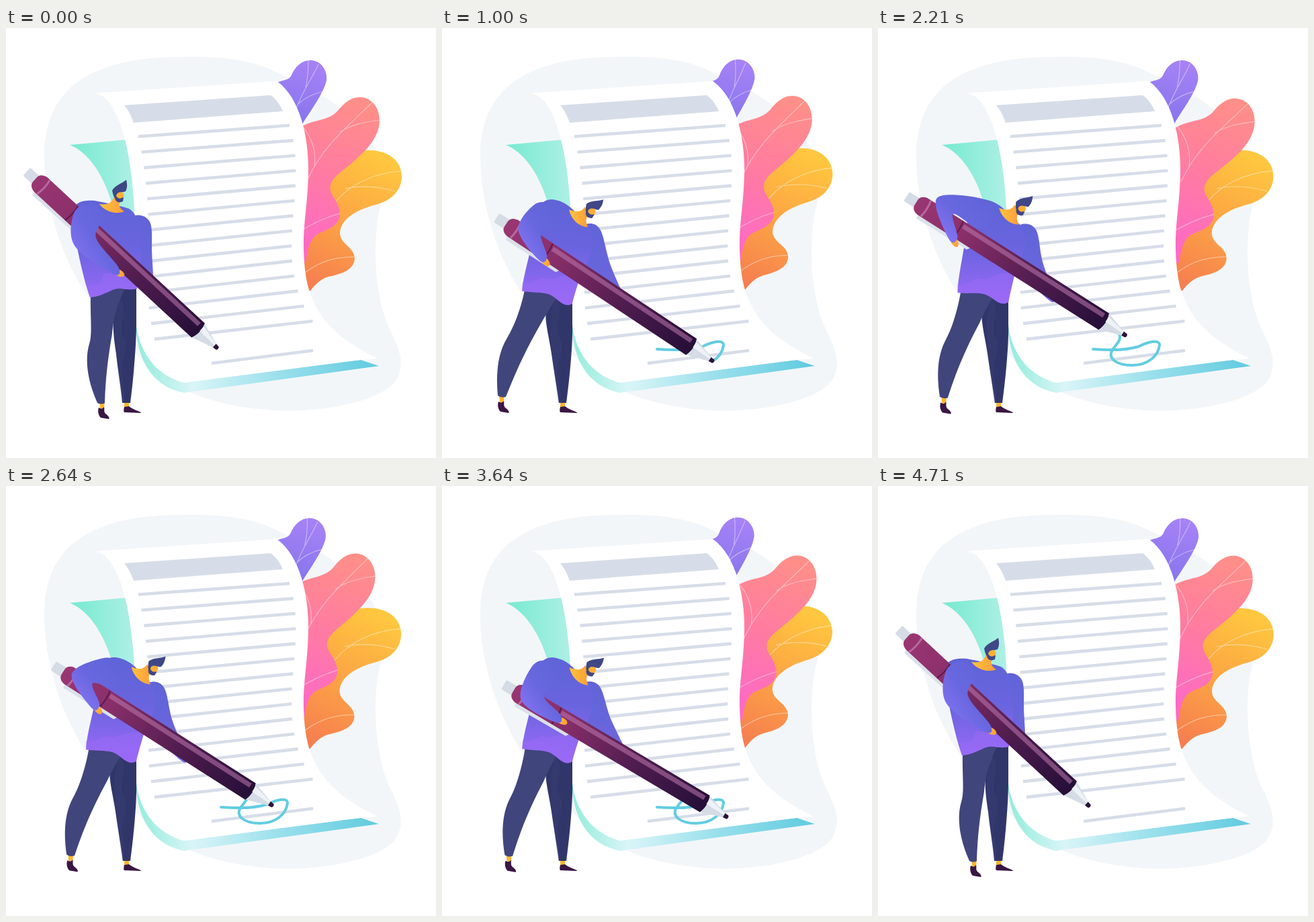
Animation of 640x640 px, one loop 4780 ms. Source, as an HTML page:

```html
<!DOCTYPE html>
<html lang="en">
<head>
<meta charset="utf-8">
<title>Signing a document</title>
<style>
  html, body { margin: 0; width: 100%; height: 100%; overflow: hidden; background: #fff; }
  svg { display: block; width: 100%; height: 100%; }
  .vein { fill: none; stroke: #fff; stroke-width: 1.2; stroke-linecap: round; opacity: .42; }
  .rule { stroke: #d7dde8; stroke-width: 4.6; }
  .ink { fill: none; stroke: #62cde1; stroke-linecap: round; stroke-linejoin: round; }
</style>
</head>
<body>
<svg viewBox="0 0 640 640">
  <defs>
    <linearGradient id="violet" x1=".6" y1="0" x2=".4" y2="1"><stop stop-color="#a682f6"/><stop offset="1" stop-color="#7c70e8"/></linearGradient>
    <linearGradient id="pink" gradientUnits="userSpaceOnUse" x1="530" y1="110" x2="450" y2="320"><stop stop-color="#ff8f88"/><stop offset=".5" stop-color="#ff7ca0"/><stop offset="1" stop-color="#fd6bc3"/></linearGradient>
    <linearGradient id="yellow" gradientUnits="userSpaceOnUse" x1="555" y1="190" x2="460" y2="385"><stop stop-color="#ffc73f"/><stop offset=".5" stop-color="#fca544"/><stop offset="1" stop-color="#f67e50"/></linearGradient>
    <linearGradient id="flap" gradientUnits="userSpaceOnUse" x1="100" y1="0" x2="195" y2="0"><stop stop-color="#79ead1"/><stop offset="1" stop-color="#b0f0e6"/></linearGradient>
    <linearGradient id="edge" gradientUnits="userSpaceOnUse" x1="193" y1="0" x2="545" y2="0"><stop stop-color="#92ecda"/><stop offset=".24" stop-color="#d9f5f8"/><stop offset=".6" stop-color="#9be0ec"/><stop offset="1" stop-color="#64cce0"/></linearGradient>
    <linearGradient id="shirt" gradientUnits="userSpaceOnUse" x1="0" y1="265" x2="0" y2="402"><stop stop-color="#6064d7"/><stop offset=".45" stop-color="#6a64df"/><stop offset="1" stop-color="#9869f5"/></linearGradient>
    <linearGradient id="sleeve" x1=".9" y1=".1" x2=".1" y2=".9"><stop stop-color="#6064d7"/><stop offset=".5" stop-color="#6867df"/><stop offset="1" stop-color="#8674f3"/></linearGradient>
    <linearGradient id="sleeveR" x1="0" y1="0" x2="0" y2="1"><stop stop-color="#6064d7"/><stop offset="1" stop-color="#7066e0"/></linearGradient>
    <linearGradient id="skin" x1="0" y1="0" x2="1" y2="0"><stop stop-color="#ffc43a"/><stop offset="1" stop-color="#fb9c3c"/></linearGradient>
    <linearGradient id="barrel" gradientUnits="userSpaceOnUse" x1="-366" y1="0" x2="-40" y2="0"><stop stop-color="#993672"/><stop offset=".25" stop-color="#8a2f6a"/><stop offset=".65" stop-color="#4e1c4e"/><stop offset="1" stop-color="#260f38"/></linearGradient>
  </defs>

  <path fill="#f3f6f9" d="M262 43C330 41 372 50 403 66C445 85 502 108 545 172C575 215 560 250 554 280C545 340 552 410 572 450C588 482 593 500 582 522C560 560 450 575 385 568C320 562 280 548 240 525C200 500 165 450 130 410C90 360 57 270 57 195C55 100 112 43 262 43Z"/>

  <g id="leafV">
    <path fill="url(#violet)" d="M394 86C412 75 420 80 425 70C430 58 440 48 453 48C470 48 479 65 477 78C473 97 452 125 441 143L425 175L400 140Z"/>
    <path class="vein" d="M430 125C440 95 452 82 465 54M446 88C450 72 450 60 450 48M434 114C446 102 460 97 474 94"/>
  </g>
  <g id="leafY">
    <path fill="url(#yellow)" d="M500 190C515 183 525 182 540 182C566 182 589 195 589 222C588 245 570 258 550 263C520 271 498 285 497 305C497 322 518 325 519 343C518 360 500 366 480 370C465 375 458 385 453 391L430 395L430 250Z"/>
    <path class="vein" d="M488 262C508 235 545 216 588 213M505 239C530 234 555 236 579 243M440 368C468 345 495 340 519 341"/>
  </g>
  <g id="leafP">
    <path fill="url(#pink)" d="M436 149C460 134 478 140 494 123C505 109 517 102 528 103C545 104 556 119 556 138C555 165 535 185 500 213C487 223 480 232 483 243C486 252 497 262 497 278C495 297 476 300 463 307C450 316 449 335 446 349L415 350L415 160Z"/>
    <path class="vein" d="M448 227C472 175 505 150 546 110M497 155C515 143 535 140 556 137M442 147C456 165 462 185 459 206M438 302C458 290 475 282 497 276"/>
  </g>

  <path fill="url(#flap)" d="M95 174L182 166L230 300L230 440L192 440C180 380 168 320 161 275C150 225 125 186 95 174Z"/>
  <path fill="url(#edge)" d="M193 425C191 490 215 533 265 543L555 503L528 494L265 520Z"/>
  <path fill="#fff" d="M132 97L403 79C440 105 451 170 450 215C449 265 442 290 443 330C445 390 455 445 553 492L528 494L265 528C215 515 194 470 193 430C194 380 192 300 191 270C188 200 172 102 132 97Z"/>
  <path fill="#d7dde8" d="M176 115L394 100C402 106 408 114 412 124L190 141C186 130 182 122 176 115Z"/>
  <g id="rules"></g>
  <path id="loop" class="ink" stroke-width="4" d="M320 478C345 480 372 479 388 474C400 468 419 462 419 472C417 488 402 502 378 502C352 502 342 490 349 479C356 469 363 464 359 455C354 447 344 442 335 436"/>
  <path id="slash" class="ink" stroke-width="2.4" d="M335 436L424 493"/>

  <path fill="#fdb52f" d="M176 556L183 556L183 566L176 566Z"/>
  <path fill="#3a1743" d="M176 564C175 568 175 571 176 572L201 573C202 571 190 569 183 563Z"/>
  <path id="legR" fill="#31366a"/>
  <path fill="#3d4279" opacity=".3" d="M168 400C186 420 164 440 175 460C186 480 166 500 174 525C176 540 176 550 177 558L173 557C168 520 160 470 162 430Z"/>
  <g id="foot">
    <path fill="#fdb52f" d="M-4 -3L4 -3L3 9L-3 9Z"/>
    <path fill="#3a1743" d="M-5 8C-7 14 -5 20 -2 23L10 25C12 23 9 20 5 17C2 14 4 10 3 7C1 10 -2 10 -5 8Z"/>
  </g>
  <path id="legL" fill="#40457c"/>

  <path id="armR" fill="url(#sleeveR)"/>
  <g id="trunk">
    <path id="torso" fill="url(#shirt)"/>
    <path id="hem" fill="#9c6bf8" opacity=".5"/>
    <path id="collar" fill="url(#skin)"/>
    <g id="head">
      <ellipse cx="169" cy="249" rx="6.5" ry="6" fill="#ffae35"/>
      <path fill="#3f4787" d="M158 242C162 234 172 232 179 226C181 234 180 239 178 243C174 245 170 243 166 246C163 249 164 252 167 253C170 255 173 252 175 252L174 258C168 261 163 259 162 253C159 249 159 245 158 242Z"/>
    </g>
  </g>

  <g id="pen">
    <path fill="#dbe1ea" d="M-358 10L-356 20L-268 19L-262 10Z"/>
    <rect x="-386" y="-8" width="24" height="16" rx="2" fill="#d5dce5"/>
    <path fill="url(#barrel)" d="M-38 -14.5C-34 -5 -34 5 -38 14.5L-358 14.5C-366 13 -369 9 -369 4L-369 -4C-369 -9 -366 -13 -358 -14.5Z"/>
    <path fill="#be78ad" opacity=".55" d="M-43 -11L-291 -11L-291 -4L-43 -4Z"/>
    <path fill="none" stroke="#5a1a4e" stroke-width="2" d="M-295 -14Q-292 0 -295 14"/>
    <path fill="none" stroke="#b86a9d" stroke-width="3" d="M-352 -14Q-349 0 -352 14"/>
    <path fill="#d5dce6" d="M-38 -14L-3 -3L-3 3L-38 14C-34 5 -34 -5 -38 -14Z"/>
    <path fill="#eef2f6" d="M-36 -10L-4 -3L-4 0L-36 -1Z"/>
    <path fill="#2d1238" d="M-5 -3.5L1 -3Q3.5 0 1 3L-5 3.5Z"/>
  </g>
  <ellipse id="hand" rx="9" ry="4.8" fill="url(#skin)"/>
  <path id="armL" fill="url(#sleeve)"/>
</svg>
<script>
const LOOP = 4780, SWAY = LOOP / 2;
const WRITE = 300, SLASH = 1800, LIFT = 3500, REST = 4540;
const $ = id => document.getElementById(id);
const set = (id, name, value) => $(id).setAttribute(name, value);
const lerp = (a, b, k) => a + (b - a) * k;
const mix = (a, b, k) => a.map ? a.map((v, i) => lerp(v, b[i], k)) : lerp(a, b, k);
const smooth = k => k * k * (3 - 2 * k);
const part = (t, from, to) => Math.min(1, Math.max(0, (t - from) / (to - from)));
const slowing = (k, power) => 1 - (1 - k) ** power;

// elbow and wrist belong to the near arm, grip is the far hand under the pen.
const rest = { t: 0, lean: 0, foot: 0, tilt: 0, angle: 42.8, elbow: [118, 318], wrist: [163, 361], grip: [214, 385] };
const poses = [
  rest,
  { t: 600, lean: 1, foot: 1, tilt: 0, angle: 34.1, elbow: [156, 323], wrist: [198, 359], grip: [264, 403] },
  { t: 1430, lean: 1, foot: 1, tilt: 4.6, angle: 33, elbow: [102, 280], wrist: [98, 325], grip: [277, 424] },
  { t: 2210, lean: 1, foot: .83, tilt: -1.6, angle: 32.4, elbow: [100, 265], wrist: [112, 313], grip: [258, 402] },
  { t: 3140, lean: 1, foot: .91, tilt: 4.6, angle: 32.7, elbow: [130, 314], wrist: [160, 346], grip: [271, 409] },
  { t: 4070, lean: 1, foot: .72, tilt: .8, angle: 29.1, elbow: [138, 316], wrist: [183, 347], grip: [273, 399] },
  { ...rest, t: REST },
  { ...rest, t: LOOP }
];

function poseAt(t) {
  const i = poses.findIndex(p => p.t > t), a = poses[i - 1], b = poses[i];
  const k = smooth(part(t, a.t, b.t));
  return Object.fromEntries(Object.keys(a).map(key => [key, mix(a[key], b[key], k)]));
}

// Blends two path strings that share the same commands.
function morph([from, to], k) {
  const ends = to.match(/[\d.]+/g);
  let i = 0;
  return from.replace(/[\d.]+/g, v => lerp(+v, +ends[i++], k).toFixed(2));
}

// Closed smooth curve through points.
function blob(points) {
  const n = points.length, at = i => points[(i + n) % n];
  let d = `M${at(0)}`;
  for (let i = 0; i < n; i++) {
    const [a, b, c, e] = [at(i - 1), at(i), at(i + 1), at(i + 2)];
    const c1 = b.map((v, j) => v + (c[j] - a[j]) / 6);
    const c2 = c.map((v, j) => v - (e[j] - b[j]) / 6);
    d += `C${c1} ${c2} ${c}`;
  }
  return d + 'Z';
}

// Tapered sleeve around shoulder, elbow and wrist with the given half widths.
function limb(s, e, w, [rs, re, rw]) {
  const a1 = Math.atan2(e[1] - s[1], e[0] - s[0]);
  const a2 = Math.atan2(w[1] - e[1], w[0] - e[0]);
  const turn = Math.atan2(Math.sin(a2 - a1), Math.cos(a2 - a1));
  const off = ([x, y], a, r) => [x + r * Math.cos(a), y + r * Math.sin(a)];
  const out = Math.PI / 2, mid = a1 + turn / 2;
  return blob([
    off(s, a1 + out, rs), off(e, mid + out, re), off(w, a2 + out, rw),
    off(w, a2 - out, rw), off(e, mid - out, re), off(s, a1 - out, rs), off(s, a1, -rs * .75)
  ]);
}

// Each pair is the standing and the leaning shape.
const shapes = {
  legR: ['M165 390C156 430 160 460 164 485C168 520 172 540 173 558L185 558C190 520 194 470 194 440L194 386Z',
         'M160 400C148 425 158 450 163 485C168 520 172 540 174 558L185 558C190 520 195 470 194 440L194 404Z'],
  torso: ['M98 282C97 258 115 256 132 257C152 261 168 264 180 268C200 272 210 330 195 370C195 376 195 382 195 388C178 392 172 384 158 390C146 396 136 400 125 401C114 370 104 320 98 282Z',
          'M136 292C136 262 146 255 160 255C185 258 195 275 212 292C224 300 226 330 205 366C200 385 196 398 194 409C180 417 172 400 158 396C146 393 134 395 119 393C119 370 131 330 136 292Z'],
  hem: ['M122 383C140 385 142 378 145 366C160 362 175 375 195 372L195 388C178 392 172 384 158 390C146 396 136 400 125 401Z',
        'M119 380C135 385 140 370 152 373C165 378 175 362 204 366L194 409C180 417 172 400 158 396C146 393 134 395 119 393Z'],
  collar: ['M139 262C152 264 158 260 161 250L172 256C166 262 168 268 176 273C165 278 148 274 139 262Z',
           'M184 269C195 273 204 272 207 264L214 276C208 281 210 288 213 294C200 294 188 284 184 269Z']
};
const legL = ['M126 395C125 430 129 455 124 470C118 490 119 520 136 558C140 560 144 560 147 558C148 520 152 490 158 455C160 435 162 420 178 385Z',
              'M123 390C116 425 104 450 96 463C83 485 80 515 83 547C87 550 91 550 95 549C105 525 118 490 150 435C156 425 162 415 175 395Z'];

// Text rules follow the bend of the sheet.
const rule = (a, b, c, d) => `<line class="rule" x1="${a}" y1="${b}" x2="${c}" y2="${d}"/>`;
let rules = rule(306, 499, 457, 480);
for (let i = 0; i < 14; i++) {
  const left = 212 - 15 * Math.max(0, 1 - i / 6) ** 2 + 9 * Math.max(0, (i - 10) / 3) ** 2;
  const right = 422 + .3 * (i ** 3 / 3 - 5.5 * i * i + 24 * i);
  rules += rule(left, 161.5 + 23.2 * i, right, 145 + 22.4 * i);
}
$('rules').innerHTML = rules;

const loopLen = $('loop').getTotalLength(), slashLen = $('slash').getTotalLength();
const home = [314, 476], start = [320, 478], end = [424, 493], swing = [429, 423];

function penTip(t, loop, slash) {
  if (t < WRITE) return mix(home, start, smooth(t / WRITE));
  if (t < LIFT) {
    const p = t < SLASH ? $('loop').getPointAtLength(loop) : $('slash').getPointAtLength(slash);
    return [p.x, p.y];
  }
  const k = smooth(part(t, LIFT, REST) ** 1.7);
  return mix(mix(end, swing, k), mix(swing, home, k), k);
}

function ink(id, drawn, len, shown) {
  set(id, 'stroke-dasharray', `${drawn} ${len + 10}`);
  set(id, 'visibility', shown && drawn > 0 ? 'visible' : 'hidden');
}

function draw(t) {
  const phase = 2 * Math.PI * t / SWAY, back = Math.cos(phase) - 1;
  set('leafV', 'transform', `rotate(${2.05 * back} 428 250)`);
  set('leafY', 'transform', `rotate(${.96 * back} 430 462)`);
  set('leafP', 'transform', `rotate(${-1.83 * Math.sin(phase)} 400 468)`);

  const { lean, foot, tilt, angle, elbow, wrist, grip } = poseAt(t);
  for (const id in shapes) set(id, 'd', morph(shapes[id], lean));
  set('legL', 'd', morph(legL, foot));
  set('foot', 'transform', `translate(${lerp(143, 89, foot)} ${lerp(557, 548, foot)})`);
  set('trunk', 'transform', `rotate(${tilt} 157 402)`);
  set('head', 'transform', `translate(${48 * lean} ${21 * lean}) rotate(${20 * lean} 168 250)`);

  const near = mix([123, 278], [155, 277], lean), far = mix([197, 292], [218, 305], lean);
  const farElbow = mix(far, grip, .5);
  farElbow[0] -= lerp(5, 9, lean);
  set('armL', 'd', limb(near, elbow, wrist, [22, 17, 6.5]));
  set('armR', 'd', limb(far, farElbow, grip, [18, 17, 5]));
  const aim = Math.atan2(wrist[1] - elbow[1], wrist[0] - elbow[0]);
  set('hand', 'transform', `translate(${wrist[0] + 7 * Math.cos(aim)} ${wrist[1] + 5 * Math.sin(aim)}) rotate(${aim * 180 / Math.PI - 15})`);

  const loop = loopLen * slowing(part(t, WRITE, SLASH), 1.12);
  const slash = slashLen * slowing(part(t, SLASH, LIFT), 1.7);
  const shown = t < 4620;
  ink('loop', loop, loopLen, shown);
  ink('slash', slash, slashLen, shown);
  set('pen', 'transform', `translate(${penTip(t, loop, slash)}) rotate(${angle})`);
}

function tick() {
  draw(performance.now() % LOOP);
  requestAnimationFrame(tick);
}
tick();
</script>
</body>
</html>
```
